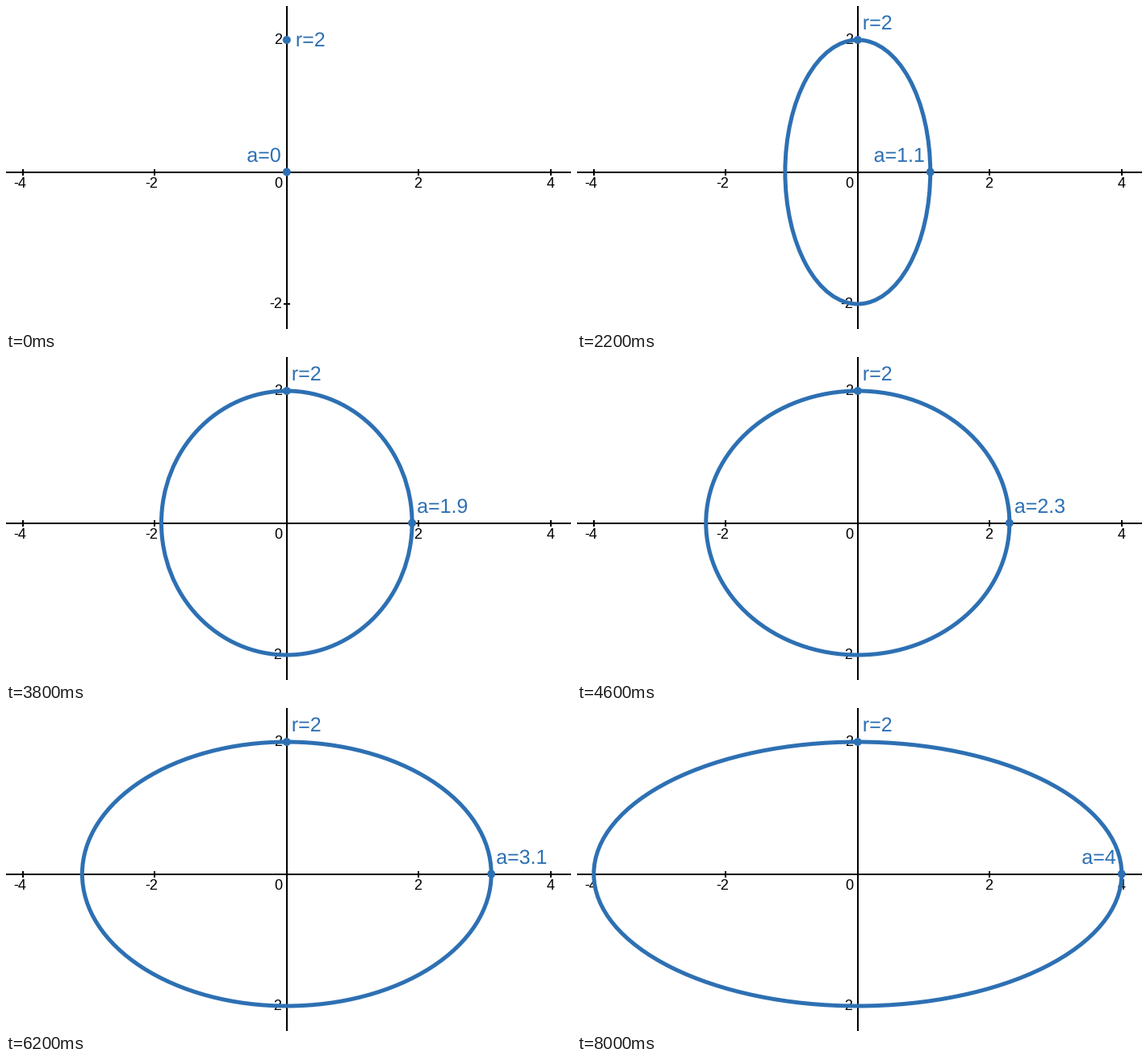
Recreate the animation shown at these times as a matplotlib script. Size 700 by 400 pixels, loop 8.2 s.

```python
import matplotlib.pyplot as plt
from matplotlib import patheffects
from matplotlib.animation import FuncAnimation
from matplotlib.patches import Circle, Ellipse

W, H, DPI = 700, 400, 100
PX = 72 / DPI                       # one pixel in points
X0, Y0, UNIT = 347.8, 205.5, 81.75  # plot origin and scale in pixels
RADIUS = 2
STEPS, INTERVAL = 41, 200
BLUE = "#2d70b3"

plt.rcParams["font.family"] = "Liberation Sans"

fig = plt.figure(figsize=(W / DPI, H / DPI), dpi=DPI, facecolor="white")
ax = fig.add_axes([0, 0, 1, 1])
ax.set_xlim(0, W)
ax.set_ylim(H, 0)
ax.axis("off")


def px(x):
    return X0 + x * UNIT


def py(y):
    return Y0 - y * UNIT


def stroke(x1, y1, x2, y2):
    ax.plot([x1, x2], [y1, y2], color="black", lw=2 * PX,
            solid_capstyle="butt", zorder=1)


def tick_label(x, y, value):
    ax.text(x, y, f"{value}", fontsize=18 * PX, color="black",
            ha="right", va="baseline", zorder=2)


def label(text):
    halo = patheffects.withStroke(linewidth=3 * PX, foreground="white")
    return ax.text(0, 0, text, fontsize=25 * PX, color=BLUE, va="baseline",
                   path_effects=[halo], zorder=5)


def dot(x, y):
    return ax.add_patch(Circle((px(x), py(y)), 5, fc=BLUE, lw=0, zorder=4))


def draw_grid():
    ax_x, ax_y = 348, 206
    stroke(0, ax_y, W, ax_y)
    stroke(ax_x, 0, ax_x, H)
    for v in (-4, -2, 2, 4):
        x = round(px(v))
        stroke(x, ax_y - 4, x, ax_y + 4)
        tick_label(x + 4.5, 225, v)
    for v in (-2, 2):
        y = round(py(v))
        stroke(ax_x - 4, y, ax_x + 4, y)
        tick_label(342.5, y + 5, v)
    tick_label(342.5, 225, 0)


def label_on_left(step):
    # left where it clears the axis and the curve, or would leave the stage
    return step == 0 or 9 <= step <= 12 or step >= 35


draw_grid()
curve = ax.add_patch(Ellipse((X0, Y0), 1, 2 * RADIUS * UNIT, fill=False,
                             ec=BLUE, lw=5 * PX, zorder=3))
dot(0, RADIUS)
a_dot = dot(0, 0)
r_label = label(f"r={RADIUS}")
a_label = label("")


def update(step):
    a = step / 10
    x = px(a)
    curve.set_visible(step > 0)
    curve.set_width(max(2 * a * UNIT, 1))
    a_dot.center = (x, Y0)
    r_label.set_position((X0 + 6, 29) if step else (X0 + 11, 50))
    a_label.set_text(f"a={a:g}")
    left = label_on_left(step)
    a_label.set_ha("right" if left else "left")
    a_label.set_position((x - 7 if left else x + 6, 193))
    return curve, a_dot, r_label, a_label


anim = FuncAnimation(fig, update, frames=STEPS, interval=INTERVAL,
                     repeat=True, repeat_delay=0, blit=False)
plt.show()
```
